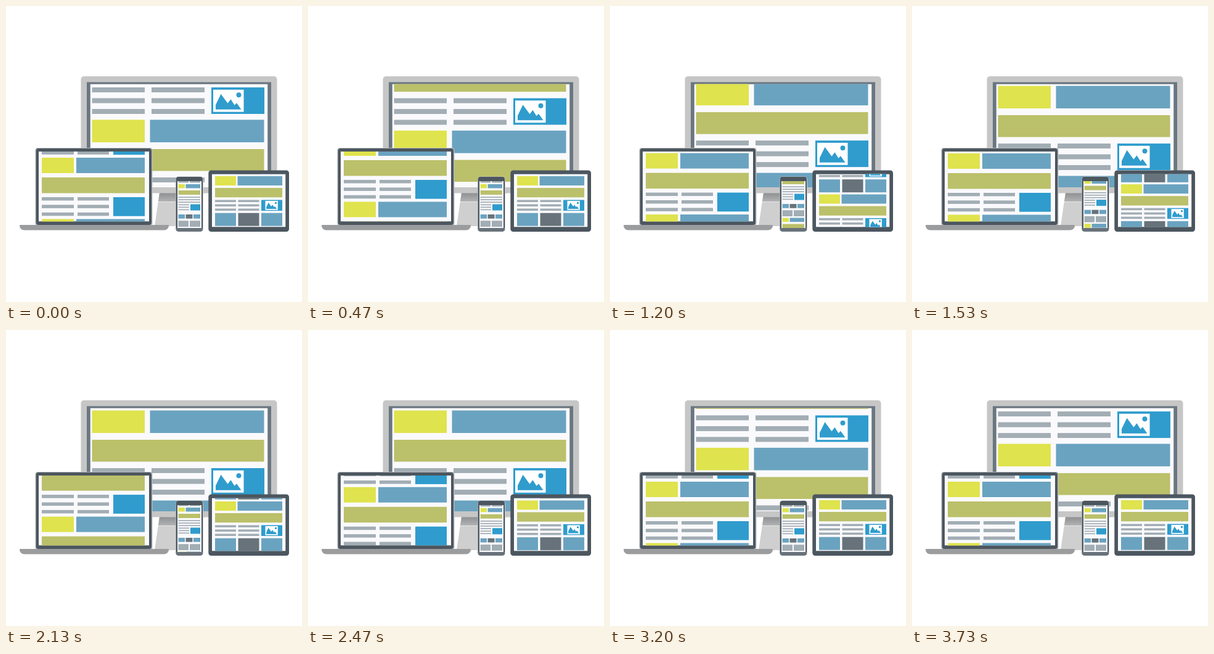
Animation of 480 by 480 pixels, one loop 4.07 s. Source, as an HTML page with a canvas:

```html
<!DOCTYPE html>
<html lang="en">
<head>
<meta charset="utf-8">
<title>Responsive devices</title>
<style>
html, body { margin: 0; width: 100%; height: 100%; overflow: hidden; background: #fff; }
canvas { display: block; width: 480px; height: 480px; }
</style>
</head>
<body>
<canvas id="stage" width="480" height="480"></canvas>
<script>
const ctx = document.getElementById('stage').getContext('2d');
const LOOP = 4070, STEP = 200 / 3, LAST = 56;
const C = {
  yellow: '#dfe34d', blue: '#6aa3c0', green: '#bbc06a', bright: '#2f9ccd',
  line: '#a2adb4', slate: '#67727a', page: '#fafafd', shell: '#4c565f'
};

// Scroll moves: [start ms, duration ms, distance px]
const MOVES = {
  monitor: [[387, 1920, 92], [2540, 1600, -92]],
  laptop: [[0, 1820, 92.5], [2023, 1180, -92.5]],
  phone: [[475, 2900, 71.5]],
  tablet: [[679, 2760, -84]]
};

const easeOut = p => 1 - Math.pow(1 - Math.min(1, Math.max(0, p)), 5);
const scroll = (name, t) =>
  MOVES[name].reduce((sum, [start, dur, dist]) => sum + dist * easeOut((t - start) / dur), 0);

function box(color, x1, y1, x2, y2) {
  ctx.fillStyle = color;
  ctx.fillRect(x1, y1, x2 - x1, y2 - y1);
}

function round(color, x1, y1, x2, y2, r) {
  ctx.fillStyle = color;
  ctx.beginPath();
  ctx.roundRect(x1, y1, x2 - x1, y2 - y1, r);
  ctx.fill();
}

function poly(color, ...pts) {
  ctx.fillStyle = color;
  ctx.beginPath();
  pts.forEach(([x, y]) => ctx.lineTo(x, y));
  ctx.fill();
}

function lines(x1, x2, y, count, pitch, h) {
  for (let i = 0; i < count; i++) box(C.line, x1, y + i * pitch, x2, y + i * pitch + h);
}

function picture(x, y, s) {
  ctx.save();
  ctx.translate(x, y);
  ctx.scale(s, s);
  box('#fff', 0, 0, 49.5, 36);
  poly(C.bright, [4, 32], [4, 24.5], [12.5, 7], [23.5, 22], [28.5, 15.5],
    [34.5, 25], [38, 21.5], [45.5, 32]);
  ctx.beginPath();
  ctx.arc(41.5, 8.5, 4, 0, Math.PI * 2);
  ctx.fill();
  ctx.restore();
}

// Repeats a page block down a clipped screen
function screen(x1, y1, x2, y2, top, period, block) {
  ctx.save();
  ctx.beginPath();
  ctx.rect(x1, y1, x2 - x1, y2 - y1);
  ctx.clip();
  box(C.page, x1, y1, x2, y2);
  let y = top;
  while (y > y1) y -= period;
  for (; y < y2; y += period) block(y);
  ctx.restore();
}

function monitor(t) {
  poly('#cfcfcf', [249, 302], [322, 302], [330, 357], [241, 357]);
  const shade = ctx.createLinearGradient(0, 303, 0, 317);
  shade.addColorStop(0, '#8f9092');
  shade.addColorStop(1, '#b2b3b4');
  poly(shade, [249, 303], [276, 303], [276, 317], [247, 317]);
  ctx.strokeStyle = '#fff';
  ctx.setLineDash([1, 1]);
  ctx.beginPath();
  ctx.moveTo(247, 317.5);
  ctx.lineTo(275, 317.5);
  ctx.stroke();
  ctx.setLineDash([]);
  box('#fff', 319, 304, 331, 358);

  round('#c6c6c6', 121.5, 114, 439.5, 303.5, 5);
  box('#6a7680', 131, 123.5, 430, 294);
  screen(136.5, 126.5, 424.5, 294, 132 + scroll('monitor', t), 146, y => {
    lines(139.5, 225, y, 3, 17.5, 8);
    lines(236, 322, y, 3, 17.5, 8);
    box(C.bright, 333, y, 419, y + 43);
    picture(336, y + 3.7, 1);
    box(C.yellow, 139.5, y + 52.5, 225, y + 89);
    box(C.blue, 233.5, y + 52.5, 418.5, y + 89);
    box(C.green, 139.5, y + 100, 418.5, y + 135.5);
  });
}

function laptop(t) {
  round('#b3b7ba', 47.5, 230, 237.5, 356, 4);
  round(C.shell, 48.7, 231, 236, 355, 4);
  screen(53, 236, 232, 349.5, 246 + scroll('laptop', t), 99.5, y => {
    box(C.yellow, 58, y, 110, y + 25);
    box(C.blue, 114, y, 225, y + 25);
    box(C.green, 58, y + 32, 225, y + 57.5);
    lines(58, 110, y + 64, 3, 12.4, 5.5);
    lines(116, 167, y + 64, 3, 12.4, 5.5);
    box(C.bright, 174, y + 64, 225, y + 94.7);
  });
  round('#9b9c9e', 22, 355, 264, 363.5, [1, 1, 8, 8]);
}

function phone(t) {
  round('#c3c6c9', 275, 276.5, 320, 366, 5);
  round(C.shell, 275.7, 277, 319, 365.5, 4);
  round('#68727b', 275.7, 359.5, 319, 365.5, [0, 0, 4, 4]);
  screen(278, 284, 317, 360, 289 + scroll('phone', t), 71.5, y => {
    box(C.yellow, 279.5, y, 290, y + 6.5);
    box(C.blue, 291.5, y, 315, y + 6.5);
    box(C.green, 279.5, y + 10, 315, y + 17);
    lines(279.5, 315, y + 20.3, 3, 4, 1.7);
    lines(279.5, 297, y + 32.5, 3, 4, 1.7);
    box(C.bright, 299, y + 32.5, 315, y + 42.5);
    box(C.blue, 279.5, y + 49, 290, y + 55.7);
    box(C.slate, 291.5, y + 49, 302.5, y + 55.7);
    box(C.blue, 304, y + 49, 315, y + 55.7);
    box(C.line, 279.5, y + 59.2, 296, y + 69);
    box(C.line, 298, y + 59.2, 315, y + 69);
  });
}

function tablet(t) {
  round(C.shell, 328.3, 266.5, 459, 366, 4.5);
  screen(334, 272.5, 453.5, 358.5, 276 + scroll('tablet', t), 84, y => {
    box(C.yellow, 339, y, 373, y + 15);
    box(C.blue, 375.5, y, 448, y + 15);
    box(C.green, 339, y + 19, 448, y + 34.3);
    lines(339, 373, y + 38.5, 3, 7, 3.5);
    lines(376.5, 410.5, y + 38.5, 3, 7, 3.5);
    box(C.bright, 414, y + 38.5, 448, y + 56);
    picture(420.5, y + 40, 0.41);
    box(C.blue, 339, y + 59.7, 373, y + 80.7);
    box(C.slate, 376.5, y + 59.7, 410.5, y + 80.7);
    box(C.blue, 414, y + 59.7, 448, y + 80.7);
  });
}

const origin = performance.now();

function draw() {
  const now = (performance.now() - origin) % LOOP;
  const t = Math.min(LAST, Math.floor((now + 3.4) / STEP)) * STEP;
  box('#fff', 0, 0, 480, 480);
  [monitor, laptop, phone, tablet].forEach(device => device(t));
  requestAnimationFrame(draw);
}
draw();
</script>
</body>
</html>
```
